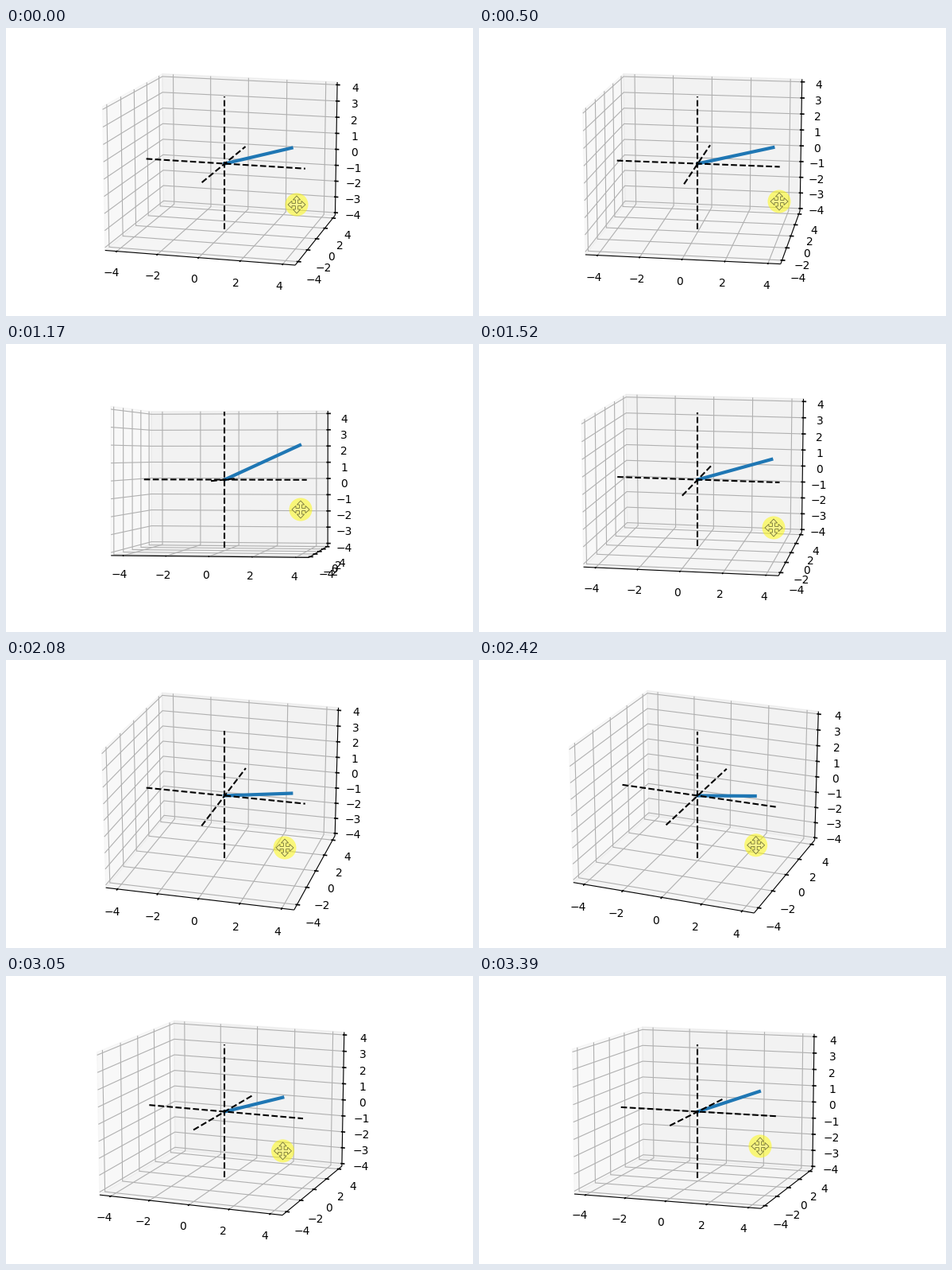
These frames come from a looping animation (588 by 362 pixels, 3590 ms). A matplotlib script:

```python
from itertools import product

import numpy as np
import matplotlib.pyplot as plt
from matplotlib.animation import FuncAnimation
from matplotlib.collections import LineCollection

W, H, DPI = 588, 362, 100
LOOP, TICK = 3590, 10
PACE = 74  # typical time between two pictures

# View: perspective camera on a 4:4:3 box
CENTER = np.array([275.4, 170.5])
SCALE, DIST = 1997.8, 10
LIMITS = np.array([4.4, 4.4, 4.0])
UNIT = np.array([8 / 7, 8 / 7, 6 / 7]) / (2 * LIMITS)
DELTA = LIMITS / 6
PAD = LIMITS * 25 / 24
LABEL_GAP = 1.037 * DELTA
BACK = np.array([-1, 1, -1])  # sides of the box that carry a pane

# Turning points of the drag: time, azimuth, elevation, pointer x, pointer y
DRAG = np.array([
    (0, -74.7, 13.0, 366, 222),
    (500, -80.9, 13.8, 378, 218),
    (830, -81.4, 6.0, 376, 196),
    (1170, -80.9, 0.9, 371, 208),
    (1520, -79.7, 10.8, 371, 231),
    (2080, -74.5, 21.2, 351, 236),
    (2220, -69.2, 22.3, 350, 235),
    (2770, -67.7, 16.0, 346, 225),
    (3390, -71.2, 9.8, 354, 214)])
TIMES, VALUES = DRAG[:, 0], DRAG[:, 1:]
LEGS = np.diff(TIMES)
RATES = np.diff(VALUES, axis=0) / LEGS[:, None]

# Each leg is shown in evenly spaced jumps
STEPS = np.concatenate(
    [np.linspace(t, t + leg, round(leg / PACE), endpoint=False)
     for t, leg in zip(TIMES, LEGS)] + [TIMES[-1:]])

# Harmonic mean of neighbouring rates, zero where the motion turns back
before, after = RATES[:-1], RATES[1:]
same = before * after > 0
total = np.where(same, before + after, 1)
SLOPES = np.pad(np.where(same, 2 * before * after / total, 0),
                ((1, 1), (0, 0)))


def drag_at(t):
    i = min(np.searchsorted(TIMES, t, side="right") - 1, len(LEGS) - 1)
    h = LEGS[i]
    u = (t - TIMES[i]) / h
    return ((1 + 2 * u) * (1 - u) ** 2 * VALUES[i]
            + u * (1 - u) ** 2 * h * SLOPES[i]
            + u * u * (3 - 2 * u) * VALUES[i + 1]
            + u * u * (u - 1) * h * SLOPES[i + 1])


def project(points, azim, elev):
    x, y, z = np.moveaxis(np.asarray(points, float) * UNIT, -1, 0)
    a, e = np.radians([azim, elev])
    toward = np.cos(a) * x + np.sin(a) * y
    right = np.cos(a) * y - np.sin(a) * x
    up = np.cos(e) * z - np.sin(e) * toward
    depth = DIST - np.cos(e) * toward - np.sin(e) * z
    return CENTER + SCALE * np.stack([right, -up], -1) / depth[..., None]


def place(axes, coords):
    p = np.zeros(3)
    p[list(axes)] = coords
    return p


# Box geometry: for each axis a pane, an edge, and its ticks and grid lines
panes, edges, grid, ticks, anchors, names = [], [], [], [], [], []
for axis in range(3):
    j, k = others = [n for n in range(3) if n != axis]
    ring = [(-1, -1), (-1, 1), (1, 1), (1, -1)]
    panes.append([place((axis, j, k), (BACK[axis], *c)) * PAD for c in ring])

    path = [place(others, BACK[others] * flip) * PAD
            for flip in ((-1, 1), (1, 1), (1, -1))]
    base = path[0]
    end = place([axis], PAD[axis])
    edges.append([base - end, base + end])

    out = place([j], np.sign(base[j]) * DELTA[j])
    for v in range(-4, 5, 1 if axis == 2 else 2):
        shift = place([axis], v)
        tick = base + shift
        grid.append([p + shift for p in path])
        ticks.append([tick - 0.1 * out, tick + 0.2 * out])
        anchors.append(tick + np.sign(base) * LABEL_GAP)
        names.append(str(v).replace("-", "\u2212"))
dashes = [[-4 * d, 4 * d] for d in np.eye(3)]
vector = [(0, 0, 0), (4, -3, 2)]

# Four-way move pointer: one arm turned four times
arm = np.array([(-1.6, -1.6), (-1.6, -6), (-4.6, -6), (0, -11),
                (4.6, -6), (1.6, -6)])
turn = np.array([(0, 1), (-1, 0)])
arrows = np.vstack([arm @ np.linalg.matrix_power(turn, n) for n in range(4)])

plt.rcParams["font.family"] = "DejaVu Sans"
fig = plt.figure(figsize=(W / DPI, H / DPI), dpi=DPI, facecolor="white")
ax = fig.add_axes([0, 0, 1, 1])
ax.set(xlim=(0, W), ylim=(H, 0))
ax.axis("off")


def add_lines(color, width, z):
    return ax.add_collection(
        LineCollection([], colors=color, linewidths=width, zorder=z),
        autolim=False)


pane_art = [ax.fill([0], [0], color=(g, g, g, 0.5), lw=1, zorder=1)[0]
            for g in (0.95, 0.9, 0.925)]
grid_art = add_lines("#b0b0b0", 0.8, 2)
edge_art = add_lines("black", 0.8, 3)
tick_art = add_lines("black", 1.2, 3)
labels = [ax.text(0, 0, s, fontsize=10, ha="center", va="top", zorder=4)
          for s in names]
vector_art, = ax.plot([], [], color="#1f77b4", lw=3, zorder=5)
dash_art = [ax.plot([], [], "k--", lw=1.5, zorder=6)[0] for _ in dashes]
halo = plt.Circle((0, 0), 14.5, fc=(1, 0.98, 0, 0.5), ec="none", zorder=7)
ax.add_patch(halo)
hand = ax.fill([0], [0], fc="#f8f58c", ec="#75753a", lw=0.6, zorder=8)[0]


def update(i):
    t = STEPS[np.searchsorted(STEPS, i * TICK + 1e-6, side="right") - 1]
    azim, elev, *spot = drag_at(t)

    def view(points):
        return project(points, azim, elev)

    for art, shape in zip(pane_art, panes):
        art.set_xy(view(shape))
    for art, shape in ((grid_art, grid), (edge_art, edges), (tick_art, ticks)):
        art.set_segments(view(shape))
    for label, pos in zip(labels, view(anchors)):
        label.set_position(pos)
    for line, shape in zip(dash_art + [vector_art], dashes + [vector]):
        line.set_data(*view(shape).T)

    halo.center = tuple(spot)
    hand.set_xy(arrows + spot)
    return []


anim = FuncAnimation(fig, update, frames=LOOP // TICK, interval=TICK,
                     init_func=lambda: update(0), repeat=True, repeat_delay=0)
plt.show()
```
